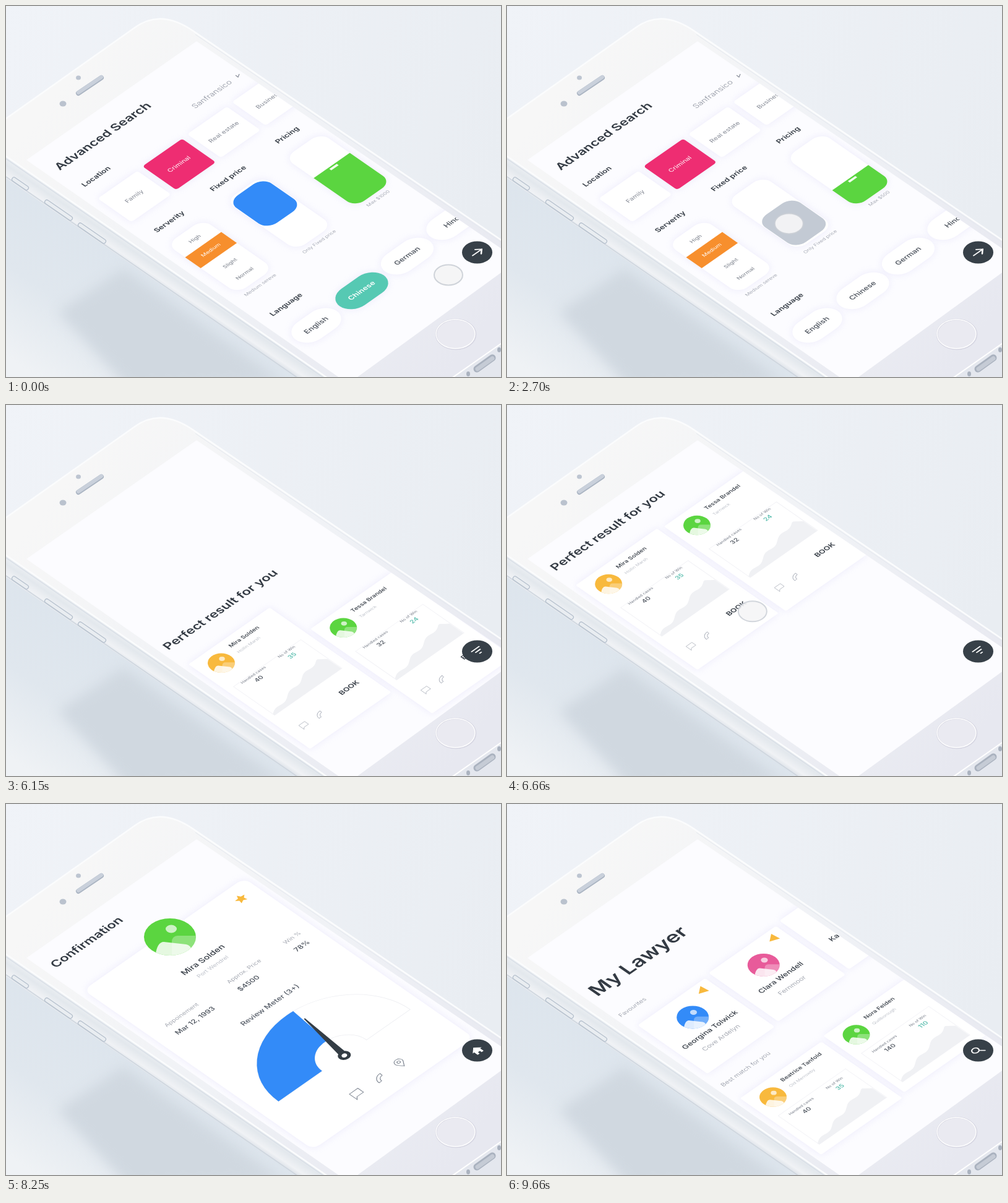
An HTML page with a canvas that plays this animation: 800 by 600 pixels, repeating every 9.69 s.

```html
<!DOCTYPE html>
<html lang="en">
<head>
<meta charset="utf-8">
<title>Lawyer finder</title>
<style>
html, body { margin: 0; width: 100%; height: 100%; overflow: hidden; background: #eef1f6; }
canvas { display: block; width: 800px; height: 600px; }
</style>
</head>
<body>
<canvas id="stage" width="800" height="600"></canvas>
<script>
const ctx = document.getElementById('stage').getContext('2d');
const LOOP = 9690;
// Axes of the tilted screen: across and down
const UX = .8, UY = -.559, VX = .7, VY = .487;
const INK = '#343b44', SLATE = '#4a515b', GREY = '#8b909c', PALE = '#a9aeb9', TEAL = '#4fb9a9';
const BLUE = '#338bf8', GREEN = '#5bd540', AMBER = '#f8b93d', PINK = '#e85b9a', MIST = '#c3cad4';

let slide = 0;   // current shift down the tilted screen

const clamp = v => Math.max(0, Math.min(1, v));
const part = (t, a, b) => clamp((t - a) / (b - a));
const mix = (a, b, p) => a + (b - a) * p;
const out2 = p => 1 - (1 - p) ** 2;
const out3 = p => 1 - (1 - p) ** 3;
const smooth = p => p * p * (3 - 2 * p);
const shown = (t, a, b) => part(t, a, a + 120) * (1 - part(t, b - 200, b));
function blend(a, b, p) {
  const ch = (c, i) => parseInt(c.slice(i, i + 2), 16);
  return `rgb(${[1, 3, 5].map(i => Math.round(mix(ch(a, i), ch(b, i), p)))})`;
}

// Stage point reached from (x, y) by going a across and b down the screen
const from = (x, y) => (a, b) => [x + UX * a + VX * b, y + UY * a + VY * b];
const plane = (x, y) => ctx.setTransform(UX, UY, VX, VY, x + VX * slide, y + VY * slide);
const flat = (x = 0, y = 0) => ctx.setTransform(1, 0, 0, 1, x + VX * slide, y + VY * slide);

function text(str, x, y, size, color = INK, weight = 400, align = 'center') {
  plane(x, y);
  ctx.font = `${weight} ${size}px Inter, "Open Sans", sans-serif`;
  ctx.textAlign = align;
  ctx.textBaseline = 'middle';
  ctx.fillStyle = color;
  ctx.fillText(str, 0, 0);
}
function box(x, y, w, h, r, color = '#fff', shadow = true) {
  plane(x, y);
  ctx.shadowColor = shadow ? 'rgba(228,225,250,.7)' : 'transparent';
  ctx.shadowBlur = 12;
  ctx.fillStyle = color;
  ctx.beginPath();
  ctx.roundRect(-w / 2, -h / 2, w, h, r);
  ctx.fill();
  ctx.shadowColor = 'transparent';
}
function paint(color, line) {
  ctx.fillStyle = ctx.strokeStyle = color;
  ctx.lineWidth = line || 1;
  if (line) ctx.stroke(); else ctx.fill();
}
function trace(pts) {
  ctx.beginPath();
  for (let i = 0; i < pts.length; i += 2) ctx.lineTo(pts[i], pts[i + 1]);
}
function poly(color, ...pts) {
  trace(pts);
  paint(color);
}
function stroke(color, width, ...pts) {
  trace(pts);
  paint(color, width);
}
function oval(x, y, rx, ry, color, line) {
  ctx.beginPath();
  ctx.ellipse(x, y, rx, ry, 0, 0, 7);
  paint(color, line);
}
function withAlpha(a, fn) {
  const old = ctx.globalAlpha;
  ctx.globalAlpha = old * a;
  fn();
  ctx.globalAlpha = old;
}
function linear(x0, y0, x1, y1, ...stops) {
  const g = ctx.createLinearGradient(x0, y0, x1, y1);
  stops.forEach((c, i) => g.addColorStop(i / (stops.length - 1), c));
  return g;
}

function phone() {
  const SLOPE = .69;
  const edge = (c, color, width) => stroke(color, width, 0, c, 600, c + 600 * SLOPE);
  slide = 0;
  flat();
  ctx.fillStyle = linear(0, 0, 800, 300, '#f0f3f8', '#e9edf2');
  ctx.fillRect(0, 0, 800, 600);
  // cast shadow
  poly(linear(160, 380, 20, 580, '#dde5ed', '#e0e7ee', '#eff2f5'), 0, 275, 470, 600, 0, 600);
  ctx.filter = 'blur(10px)';
  poly('#d0d8e0', 85, 495, 190, 425, 450, 610, 200, 620);
  ctx.filter = 'none';
  // metal side
  poly(linear(200, 376, 177, 410, '#eef1f4', '#e3e8ed', '#f0f2f5', '#ced6df'), 0, 238, 520, 600, 470, 602, 0, 279);
  // front glass
  ctx.beginPath();
  ctx.moveTo(-10, 189);
  ctx.lineTo(208, 35);
  ctx.quadraticCurveTo(250, 4, 302, 40);
  ctx.lineTo(810, 385);
  ctx.lineTo(810, 540);
  ctx.lineTo(722, 602);
  ctx.lineTo(520, 602);
  ctx.lineTo(-10, 236);
  ctx.closePath();
  paint(linear(130, 80, 740, 560, '#f7f7f7', '#f0f2f6', '#e7e8f0'));
  paint('#fbfcfd', 2.5);
  stroke('#e4e8ee', 1, 306, 46, 800, 382);
  edge(247, '#d9dfe7', 1.5);
  edge(276, '#cdd5de', 1.5);
  ctx.lineCap = 'round';
  [[23, 10], [85, 19], [139, 19]].forEach(([x, half]) => {
    const y = 271.5 + x * SLOPE;
    for (const [color, width] of [['#b4bfcc', 8], ['#e9edf1', 5.5]])
      stroke(color, width, x - half, y - half * SLOPE, x + half, y + half * SLOPE);
  });
  stroke('#aab4c2', 8, 117, 141, 154, 116);
  stroke('#c9d0db', 6, 117, 140, 154, 115);
  oval(117, 116, 4, 3.5, '#bdc5d1');
  oval(92, 158, 5.5, 4.5, '#bac2ce');
  // foot with connector
  poly('#e4e7ee', 722, 602, 800, 546, 800, 600);
  stroke('#fff', 2, 720, 602, 800, 546);
  stroke('#aab2bf', 11, 761, 587, 786, 569);
  stroke('#c5cbd5', 7, 762, 587, 786, 570);
  oval(747, 595, 3, 4, '#aab2bf');
  oval(797, 556, 3, 4, '#aab2bf');
  oval(727, 531, 32, 24, '#eaeaf1');
  oval(727, 531, 32, 24, '#d6d6e2', 2.5);
  oval(726.5, 530.5, 31.5, 23.5, '#fff', 1.4);
  ctx.lineCap = 'butt';
}

function avatar(x, y, rx, color) {
  const k = rx / 42;
  flat(x, y);
  ctx.save();
  ctx.scale(k, k);
  oval(0, 0, 42, 30, color);
  ctx.clip();
  oval(2, -13, 9, 6.5, 'rgba(255,255,255,.7)');
  ctx.beginPath();
  ctx.roundRect(3, -2, 50, 40, 9);
  paint('rgba(255,255,255,.3)');
  ctx.beginPath();
  ctx.moveTo(-24, 32);
  ctx.quadraticCurveTo(-21, 8, -10, 8);
  ctx.lineTo(26, 12);
  ctx.quadraticCurveTo(37, 14, 36, 32);
  paint('rgba(255,255,255,.84)');
  ctx.restore();
}

// Icons, drawn around the current plane origin
const icons = {
  chat(color) {
    trace([-8, -7, 9, -7, 9, 6, -4, 6, -8, 11]);
    ctx.closePath();
    paint(color, 1.1);
  },
  call(color) {
    for (const [c, width, trim] of [[color, 6.5, 0], ['#fff', 4.3, .1]]) {
      ctx.beginPath();
      ctx.arc(8, 8, 11, Math.PI - .1 + trim, Math.PI * 1.5 + .1 - trim);
      paint(c, width);
    }
  },
  pin(color) {
    ctx.beginPath();
    ctx.arc(0, -3, 7, Math.PI * .8, Math.PI * .2);
    ctx.lineTo(0, 10);
    ctx.closePath();
    paint(color, 1.1);
    oval(0, -3, 2.6, 2.6, color, 1.1);
  },
  search() {
    oval(-3, -3, 5.6, 5.6, '#fff', 2);
    stroke('#fff', 2, 1.5, 1.5, 7, 8);
  },
  arrow() {
    stroke('#fff', 2.4, -9, 0, 9, 0);
    stroke('#fff', 2.4, 2, -7, 9, 0, 2, 7);
  },
  filter() {
    for (const i of [0, 1, 2]) stroke('#fff', 2.2, 3 * i - 6, 6 * i - 6, 9 - 3 * i, 6 * i - 6);
  },
  home() {
    poly('#fff', -9, 0, 0, -9, 9, 0, 6, 0, 6, 8, 2, 8, 2, 4, -2, 4, -2, 8, -6, 8, -6, 0);
  }
};
function icon(kind, x, y, color, size = 1) {
  plane(x, y);
  ctx.scale(size, size);
  icons[kind](color);
}

function chart(color) {
  ctx.beginPath();
  ctx.moveTo(0, 0);
  for (let x = 0; x <= 1.001; x += .02) {
    const climb = 4 + 43 * x + 3 * Math.sin((x - .3) * 21);
    ctx.lineTo(135 * x, -Math.min(climb, 46 - 140 * (x - .9)));
  }
  ctx.lineTo(135, 0);
  paint(color);
}
function person(x, y, color, name, city, cases, wins, tall) {
  const p = from(x, y), h = tall ? 281 : 187, gap = tall ? 9 : 0;
  box(...p(47, h / 2 - 36), 164, h, 3);
  avatar(x, y, 22, color);
  text(name, ...p(32, -17), 10.2, INK, 500, 'left');
  text(city, ...p(32, 2), 7.6, PALE, 300, 'left');
  plane(...p(-22, 37 + 1.8 * gap));
  ctx.strokeStyle = '#f2f2f6';
  ctx.lineWidth = 1;
  ctx.strokeRect(0, 0, 136, 95);
  plane(...p(-22, 132 + 1.8 * gap));
  chart('#f0f1f4');
  [['Handled cases', cases, SLATE], ['No of Win', wins, TEAL]].forEach(([label, value, tint], i) => {
    text(label, ...p(15 + 67 * i, 48 + gap), 6.9, '#747a86');
    text(value, ...p(15 + 67 * i, 61 + gap), 11, tint, 500);
  });
  if (!tall) return;
  icon('chat', ...p(-7, 198), PALE, .7);
  icon('call', ...p(23, 198), PALE, .8);
  text('BOOK', ...p(93, 189), 12.6, INK, 600);
}

function homeView() {
  text('My Lawyer', 213, 255, 35, INK, 600);
  text('Favourites', 203, 329, 10.8, GREY, 300);
  text('Best match for you', 386, 429, 11, GREY, 300);
  const favourites = [[BLUE, 'Georgina Tolwick', 'Cove Ardelyn'], [PINK, 'Clara Wendell', 'Fernmoor'],
    [GREEN, 'Kaia Dunmere', 'Lowmere']];
  favourites.forEach(([color, name, city], i) => {
    const p = from(322 + 114.5 * i, 359 - 84.5 * i);
    box(...p(0, 0), 136, 161, 4);
    avatar(...p(-1, -30), 26, color);
    text(name, ...p(-2, 11), 13, INK, 500);
    text(city, ...p(-2, 37), 11.5, GREY, 300);
    plane(...p(50, -63));
    poly(AMBER, 2, -10, 4, 8, -11, 1);
  });
  person(430, 474, AMBER, 'Beatrice Tanfold', 'Old Merrowby', '40', '35');
  person(564.5, 373, GREEN, 'Nora Felden', 'Quillborough', '140', '110');
}

function searchView(t) {
  text('Advanced Search', 157, 211, 21.8, INK, 600);
  text('Sanfransico', 333, 143, 13.8, GREY, 300);
  flat(374, 113);
  stroke(GREY, 1.3, -3, -1, 1, 2, 3, -3);
  text('Location', 146, 276, 12.8, INK, 600);
  text('Language', 453, 483, 12.8, INK, 600);

  const picked = part(t, 1300, 1450);
  ['Family', 'Criminal', 'Real estate', 'Business'].forEach((label, i) => {
    const spot = [207.5 + 72.3 * i, 308 - 52 * i], on = i == 1 ? picked : 0;
    box(...spot, 80, 78, 5, blend('#ffffff', '#ee2d72', on));
    text(label, ...spot, 11, blend('#858a95', '#ffffff', on));
  });

  const rise = smooth(part(t, 2000, 2250));
  const flip = smooth(part(t, 2850, 3150));
  const drag = smooth(part(t, 4530, 4850));
  const columns = [['Serverity', rise < .5 ? 'Slight sereve' : 'Medium sereve'],
    ['Fixed price', 'Only Fixed price'], ['Pricing', 'Max $' + Math.round(mix(10, 20, drag)) * 50]];
  const spots = columns.map(([title, note], i) => {
    const p = from(346 + 95.3 * i, 405 - 70 * i);
    text(title, ...p(-1, -116), 12.8, INK, 600);
    text(note, ...p(-1, 94), 8.6, GREY, 300);
    box(...p(0, 0), 73, 163, 19);
    return p;
  });

  const levels = [-58, -21, 23, 57];
  const row = mix(levels[2], levels[1], rise);
  box(...spots[0](0, row), 73, 36, 0, blend('#f7ba3f', '#f78f2d', rise), false);
  ['High', 'Medium', 'Slight', 'Normal'].forEach((label, i) =>
    text(label, ...spots[0](0, levels[i]), 9.5, Math.abs(levels[i] - row) < 16 ? '#fff' : '#767c87'));

  box(...spots[1](0, mix(32, -32, flip)), 71, 91, 20, blend(MIST, BLUE, flip), false);

  const level = mix(26, -14.5, drag);
  plane(...spots[2](0, 0));
  ctx.save();
  ctx.beginPath();
  ctx.roundRect(-36.5, -81.5, 73, 163, 19);
  ctx.clip();
  ctx.fillStyle = GREEN;
  ctx.fillRect(-40, level, 80, 120);
  ctx.restore();
  ctx.fillStyle = '#f2fdee';
  ctx.fillRect(-7.5, level + 3, 15, 4.5);

  const spoken = part(t, 5200, 5350);
  ['English', 'Chinese', 'German', 'Hindi'].forEach((label, i) => {
    const spot = [501.5 + 73.5 * i, 516.5 - 56 * i], on = i == 1 ? spoken : 0;
    box(...spot, i ? 89 : 83, 54, 27, blend('#ffffff', '#56c9b3', on));
    text(label, ...spot, 12.7, blend('#454c56', '#ffffff', on), on ? 600 : 500);
  });
}

function resultView(t) {
  const rise = start => 491 * (1 - out3(part(t, start, start + 600))) - 264;
  slide = rise(6038);
  text('Perfect result for you', 348, 332, 21.8, INK, 600);
  person(349, 418, AMBER, 'Mira Solden', 'Hollin Marsh', '40', '35', true);
  slide = rise(6082) - 76;   // second card trails the first
  person(545, 360, GREEN, 'Tessa Brandel', 'Tarnwick', '32', '24', true);
}

function gauge(t, x, y) {
  const half = Math.PI;
  const ring = end => {
    ctx.beginPath();
    ctx.arc(0, 0, 133, half, end);
    ctx.arc(0, 0, 45, end, half, true);
    ctx.closePath();
  };
  plane(x, y);
  ring(2 * half);
  paint('#ecedf1', 1);
  ring(1.53 * half);
  withAlpha(1 / Math.max(.45, ctx.globalAlpha), () => paint(blend(MIST, BLUE, part(t, 7950, 8200))));
  ctx.rotate(mix(-127, -83, out2(part(t, 7400, 8250))) * half / 180);
  trace([0, -6, 108, -1, 108, 1, 0, 6]);
  ctx.closePath();
  ctx.moveTo(10, 0);
  ctx.arc(0, 0, 10, 0, 2 * half);
  ctx.moveTo(4.2, 0);
  ctx.arc(0, 0, 4.2, 2 * half, 0, true);
  paint('#343d45');
  oval(0, 0, 4.2, 4.2, '#fff');
}
function confirmView(t) {
  const left = 1 - out2(part(t, 7400, 7900));
  const p = from(265, 215);
  slide = 87 * left;
  text('Confirmation', 131, 224, 21.8, INK, 600);
  slide = 67 * left;
  withAlpha(part(t, 7600, 7850), () => box(...p(-2, 253), 324, 530, 14));
  withAlpha(mix(.7, 1, part(t, 7550, 7900)), () => avatar(...p(0, 0), 42, GREEN));
  plane(...p(127, 19));
  const star = [];
  for (let i = 0; i < 10; i++) {
    const r = i % 2 ? 4.8 : 10, a = (i / 5 - .5) * Math.PI;
    star.push(r * Math.cos(a), r * Math.sin(a));
  }
  poly(AMBER, ...star);
  text('Mira Solden', ...p(0, 76.5), 14.6, INK, 500);
  text('Port Wendrel', ...p(0, 99), 10, PALE, 300);
  [['Appoinement', 'Mar 12, 1993', -134], ['Approx. Price', '$4500', -8], ['Win %', '78%', 106]].forEach(([label, value, a]) => {
    text(label, ...p(a, 143), 10.5, GREY, 300, 'left');
    text(value, ...p(a, 168), 12.6, SLATE, 500, 'left');
  });
  text('Review Meter (3+)', ...p(2, 229), 13, '#545b66', 500);
  gauge(t, ...p(4, 398));
  ['chat', 'call', 'pin'].forEach((kind, i) => icon(kind, ...p(44 * i - 39, 475), '#7a828e'));
}

function fab(t) {
  slide = 0;
  flat(761.5, 398.5);
  oval(0, 0, 24.5, 18, '#374048');
  ctx.lineCap = 'round';
  const kind = t < 500 || t > 9150 ? 'search' : t < 5980 ? 'arrow' : t < 7300 ? 'filter' : 'home';
  icon(kind, 761.5, 398.5);
  ctx.lineCap = 'butt';
}

// Finger stops: time, x, y
const stops = [
  [100, 725, 428], [300, 762, 399], [1050, 302, 310], [1300, 284, 262], [2000, 332, 396],
  [2800, 464, 349], [4380, 552, 270], [4850, 525, 251], [5200, 575, 461], [5550, 715, 435],
  [5780, 762, 399], [6800, 370, 329], [7500, 748, 386], [8700, 762, 399], [LOOP, 762, 399]
];
function touch(t) {
  const alpha = shown(t, 60, 5930) + shown(t, 6550, 7600) + shown(t, 8400, 8900);
  if (!alpha) return;
  const i = Math.max(1, stops.findIndex(s => s[0] > t));
  const [t0, x0, y0] = stops[i - 1], [t1, x1, y1] = stops[i];
  const p = smooth(part(t, t0 + 150, t1));
  const press = shown(t, 4250, 5050);
  const size = 1 - .07 * press;
  slide = 0;
  flat(mix(x0, x1, p), mix(y0, y1, p));
  ctx.globalAlpha = alpha;
  oval(0, 0, 23 * size, 16.5 * size, `rgba(245,245,246,${mix(.95, .5, press)})`);
  oval(0, 0, 23 * size, 16.5 * size, 'rgba(200,205,212,.85)', 2);
  ctx.globalAlpha = 1;
}

function view(draw, alpha, shift, t) {
  if (alpha <= 0) return;
  slide = shift;
  ctx.globalAlpha = alpha;
  draw(t);
  ctx.globalAlpha = 1;
}
function render(now) {
  const loop = now % LOOP;
  const t = loop < 30 ? 5550 : loop;   // opens on a still of the filled-in search
  phone();
  ctx.save();
  poly('#fcfcff', 33, 249, 308, 57, 828, 411, 553, 611);
  ctx.clip();
  if (t < 700) view(homeView, 1 - part(t, 420, 650), 0, t);
  if (t > 650 && t < 6040) {
    const p = part(t, 650, 1210);
    view(searchView, clamp(p * 2.2) * (1 - part(t, 5940, 6040)), 60 * (1 - out3(p)), t);
  }
  if (t > 6038 && t < 7350) view(resultView, 1 - part(t, 7120, 7340), 0, t);
  if (t > 7400 && t < 9150) view(confirmView, out2(part(t, 7400, 7900)) * (1 - part(t, 8910, 9130)), 0, t);
  if (t > 9130) {
    const p = part(t, 9130, 9600);
    view(homeView, clamp(p * 1.6), 60 * (1 - out3(p)), t);
  }
  ctx.restore();
  fab(t);
  touch(t);
}

const began = performance.now();
function tick() {
  render(performance.now() - began);
  requestAnimationFrame(tick);
}
tick();
</script>
</body>
</html>
```
